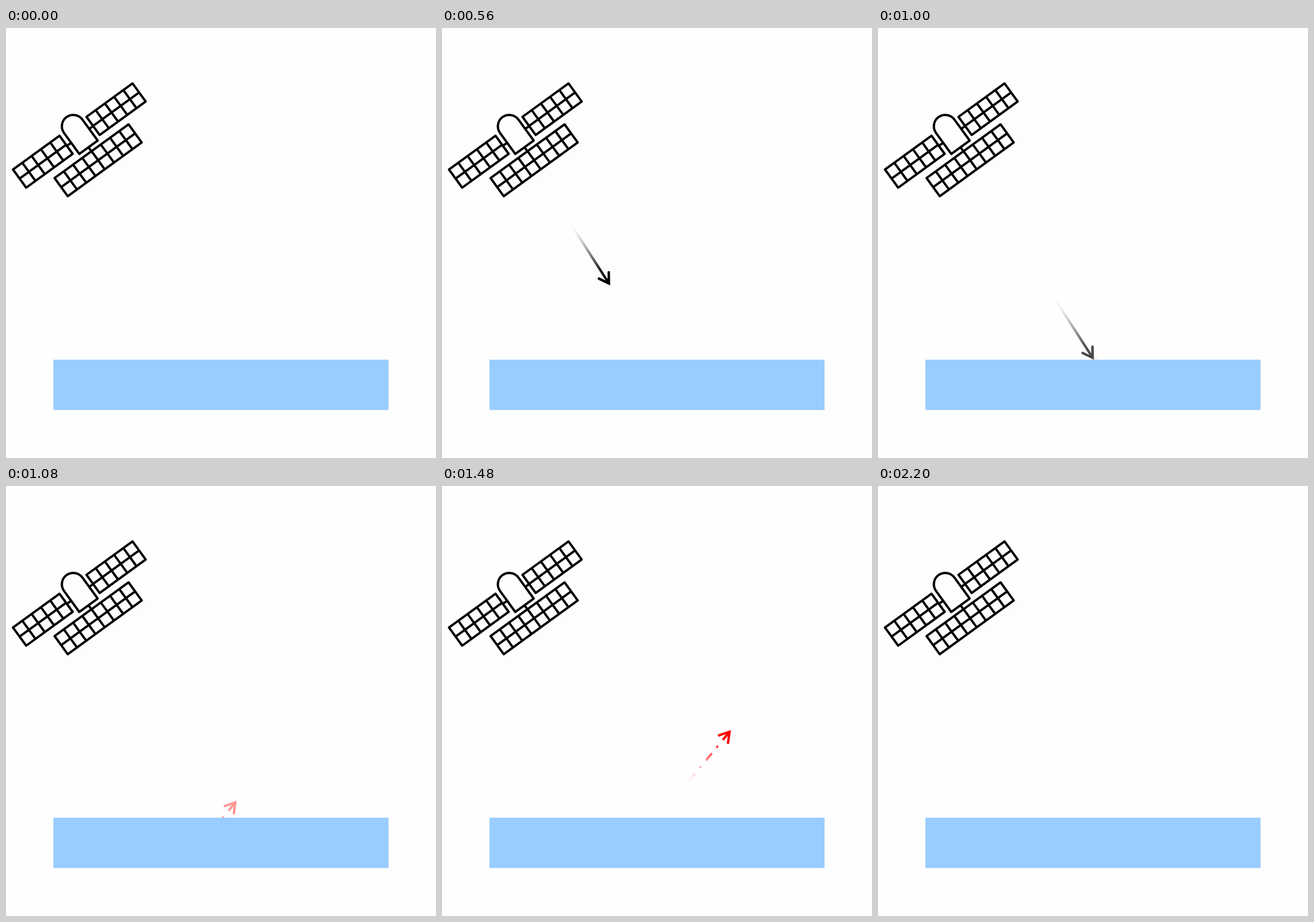
These frames come from a looping animation (748 by 748 pixels, 2240 ms). An HTML page:

```html
<!DOCTYPE html>
<html lang="en">
<head>
<meta charset="utf-8">
<title>Satellite signal reflection</title>
<style>
  html, body { margin: 0; width: 100%; height: 100%; overflow: hidden; background: #fefefe; }
  svg { display: block; width: 100%; height: 100%; }
</style>
</head>
<body>
<svg viewBox="0 0 748 748">
  <defs>
    <linearGradient id="cover" x1="0" y1="0" x2="0" y2="1">
      <stop offset=".75" stop-color="#fdfdfd"/>
      <stop offset="1" stop-color="#fdfdfd" stop-opacity="0"/>
    </linearGradient>
    <linearGradient id="blackTail" gradientUnits="userSpaceOnUse" x1="0" y1="0" x2="-126" y2="0"></linearGradient>
    <linearGradient id="redTail" gradientUnits="userSpaceOnUse" x1="0" y1="0" x2="-126" y2="0"></linearGradient>
  </defs>

  <rect width="275" height="62" fill="#fdfdfd" transform="translate(68 322) rotate(-36.9)"/>

  <g id="incident" fill="none" stroke-width="4.3" stroke-linecap="round">
    <path d="M-5 0H-126" stroke="url(#blackTail)" stroke-linecap="butt"/>
    <path d="M-21 -10.2L-4.6 0L-21 10.2" stroke="#000"/>
  </g>
  <g id="reflected" fill="none" stroke-width="4.2" stroke-linecap="round">
    <path d="M-8.75 0H-126" stroke="url(#redTail)" stroke-dasharray="12.5 17 0 16.5"/>
    <path d="M-21 -10.2L-4.6 0L-21 10.2" stroke="#f00"/>
  </g>

  <rect width="275" height="62" fill="url(#cover)" transform="translate(68 322) rotate(-36.9)"/>
  <rect x="82.5" y="577" width="583" height="87.5" fill="#9cf"/>

  <g id="satellite" fill="none" stroke="#000" stroke-width="4" stroke-linejoin="round">
    <path d="M-19.8 45V0a19.8 19.8 0 0 1 39.6 0V45zM-19.8 21H-31M19.8 20H28M0 45V54"
          transform="translate(117 171) rotate(-36)"/>
  </g>
</svg>
<script>
const LOOP = 2240, STEP = 40, ARROW = 126;
const $ = id => document.getElementById(id);
const ramp = (t, from, to) => Math.min(1, Math.max(0, (t - from) / (to - from)));

function addStops(id, color) {
  const stops = [[0, 1], [.25, .9], [.5, .5], [.67, .25], [.85, .07], [1, 0]];
  $(id).innerHTML = stops.map(([at, alpha]) =>
    `<stop offset="${at}" stop-color="${color}" stop-opacity="${alpha}"/>`).join('');
}

function addPanel(x, y, width, columns) {
  const height = 39;
  let d = `M0 0H${width}V${height}H0zM0 ${height / 2}H${width}`;
  for (let i = 1; i < columns; i++) d += `M${width * i / columns} 0V${height}`;
  $('satellite').insertAdjacentHTML('beforeend',
    `<path d="${d}" transform="translate(${x} ${y}) rotate(-36)"/>`);
}

// Places an arrow whose tip lies at a distance along a straight ray.
function placeArrow(id, ray, distance, scale, opacity) {
  const a = ray.angle * Math.PI / 180;
  const x = ray.x + distance * Math.cos(a), y = ray.y + distance * Math.sin(a);
  $(id).setAttribute('transform', `translate(${x} ${y}) rotate(${ray.angle}) scale(${scale})`);
  $(id).setAttribute('opacity', opacity);
}

const down = { x: 165.5, y: 249.8, angle: 57.3 };
const up = { x: 377, y: 577, angle: -50.5 };

function draw(t) {
  const scale = ramp(t, 80, 473);
  const center = .366 * (Math.min(t, 980) - 80) - 3;
  placeArrow('incident', down, center + ARROW / 2 * scale, scale, 1 - ramp(t, 970, 1080));

  const fade = ramp(t, 980, 1220) * (1 - ramp(t, 2040, 2200));
  placeArrow('reflected', up, .398 * Math.max(0, t - 982), 1, fade);
}

addStops('blackTail', '#000');
addStops('redTail', '#f00');
addPanel(12.2, 246.2, 100, 5);
addPanel(140, 154.5, 99, 5);
addPanel(84.5, 261, 159, 8);

const start = performance.now();
function tick() {
  const t = (performance.now() - start) % LOOP;
  draw(Math.floor(t / STEP) * STEP);
  requestAnimationFrame(tick);
}
tick();
</script>
</body>
</html>
```
